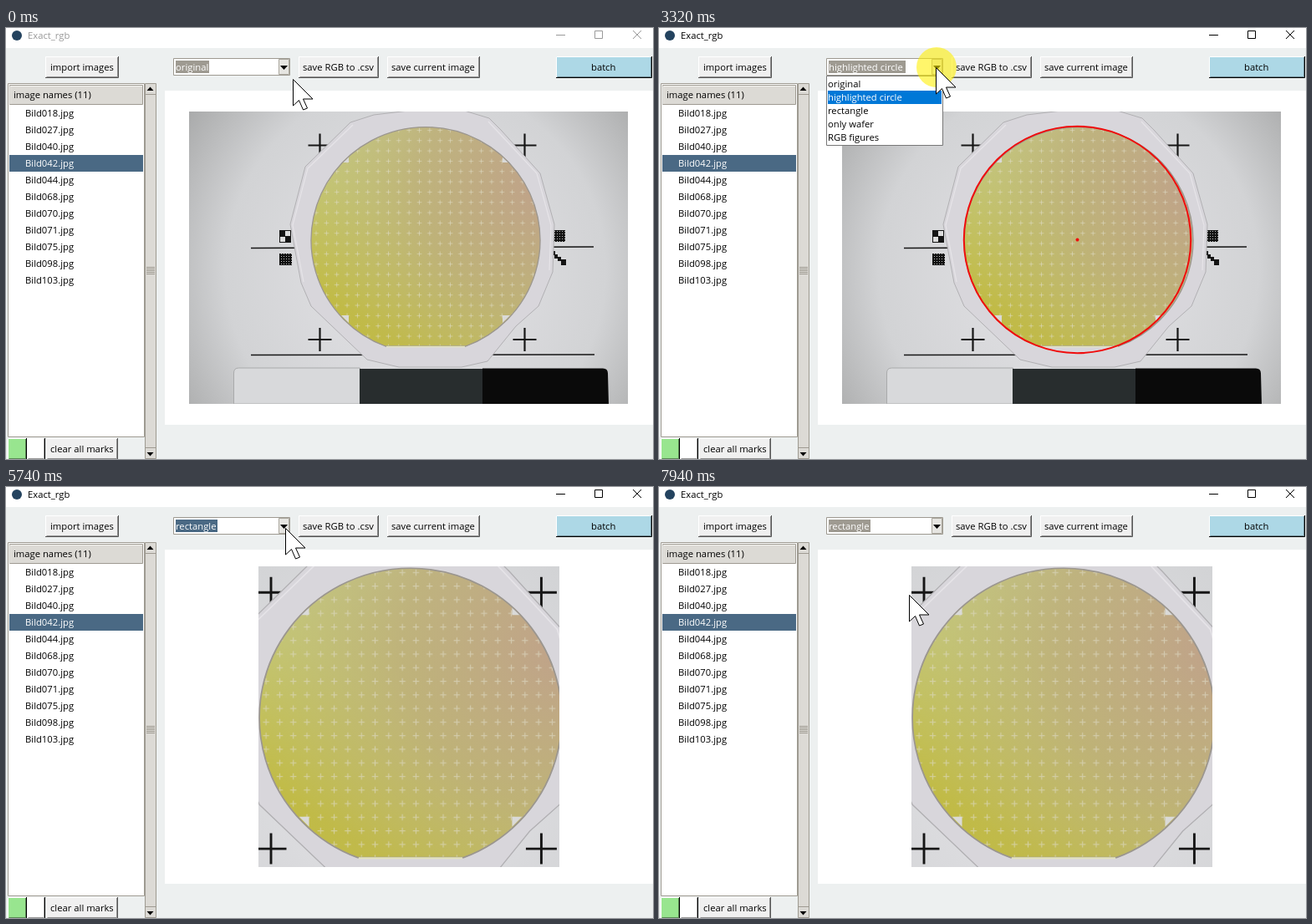
These frames come from a looping animation (774x516 px, 8000 ms). An HTML page:

```html
<!DOCTYPE html>
<html lang="en">
<head>
<meta charset="utf-8">
<title>Exact_rgb</title>
<style>
html, body { margin: 0; width: 100%; height: 100%; overflow: hidden; background: #edf0f0 }
svg { display: block }
text { font: 11.25px "Open Sans", "Noto Sans", sans-serif; white-space: pre }
</style>
</head>
<body>
<svg width="774" height="516" viewBox="0 0 774 516">
<defs>
  <radialGradient id="paper" gradientUnits="userSpaceOnUse" cx="490" cy="290" r="350">
    <stop offset=".3" stop-color="#dcdcdf"/><stop offset=".65" stop-color="#d2d3d5"/><stop offset="1" stop-color="#a2a3a3"/>
  </radialGradient>
  <linearGradient id="film" x1=".6" x2=".1" y2=".8">
    <stop offset="0" stop-color="#c6cc9c"/><stop offset=".5" stop-color="#c5c87a"/><stop offset="1" stop-color="#c1bb45"/>
  </linearGradient>
  <radialGradient id="blush" gradientUnits="userSpaceOnUse" cx="640" cy="190" r="290">
    <stop offset="0" stop-color="#c0a28a"/><stop offset=".5" stop-color="#bdad78" stop-opacity=".8"/><stop offset="1" stop-color="#bdb662" stop-opacity="0"/>
  </radialGradient>
  <pattern id="marks" patternUnits="userSpaceOnUse" x="611.83" y="362.83" width="12.35" height="12.33">
    <path d="M3.4 6.2h5.6M6.2 3.4v5.6" stroke="#ddd9c4" stroke-opacity=".65" stroke-width=".9"/>
  </pattern>
  <pattern id="check" patternUnits="userSpaceOnUse" x="655" y="242" width="3" height="3">
    <path d="M0 0h3v3h-3z" fill="#111"/><path d="M1 1h1v1h-1z" fill="#bbb"/>
  </pattern>
  <path id="disc" d="M454 381A137 135.500 0 1 1 550 381Z"/>
  <clipPath id="discClip"><use href="#disc"/></clipPath>
  <clipPath id="photoClip"><path d="M219 100h525v350H219z"/></clipPath>
  <clipPath id="cropClip"><path d="M302 95h360v360H302z"/></clipPath>
  <g id="scene" fill="none">
    <path d="M219 100h525v350H219z" fill="url(#paper)"/>
    <path d="M293 263.500L703 262M293 391.500L704 391" stroke="#161616" stroke-width="1.7"/>
    <path id="targets" stroke="#161616" stroke-width="2.200"/>
    <path d="M327 242h14v15h-14z" fill="#151515"/>
    <path d="M334 243h6v6h-6zM328 250h6v6h-6z" fill="#ddd"/>
    <path d="M327 270h15v14h-15zM655 242h14v14h-14z" fill="url(#check)"/>
    <path d="M653 267h4v4h3v3h4v3h6v7h-6v-5h-4v-3h-4v-4h-3z" fill="#151515"/>
    <path d="M272.500 450V413q0-6 6-6h145v43z" fill="#d8d9db" stroke="#a9aaab"/>
    <path d="M423 408h147v42H423z" fill="#282d2e"/>
    <path d="M570 407.500h144q6 0 6 6l1 37H570z" fill="#0a0a0a"/>
    <path d="M412 113L358 166L340 235L353 305L365 333L432 397L470 406H545L576 399L610 357L637 333L654 292L656 235L639 174L592 122L578 108L545 98H490L440 104Z" fill="#d8d6db" stroke="#b1b0b3"/>
    <path d="M415 116L361 168L343 236L356 304M577 112L635 174L652 236L650 290" stroke="#e6e4e8" stroke-width="1.200"/>
    <use href="#disc" fill="url(#film)"/>
    <use href="#disc" fill="url(#blush)"/>
    <g clip-path="url(#discClip)">
      <path d="M365 117h274v264H365z" fill="url(#marks)"/>
      <path d="M401 161l9-9v9zM594 152v9h9zM401 344h9v9zM594 344h9l-9 9z" fill="#dadad8"/>
    </g>
    <use href="#disc" stroke="#9b968f" stroke-width="1.300"/>
    <path d="M455 381.500h94" stroke="#e4e3bd" stroke-width="1.500"/>
  </g>
</defs>

<path fill="#edf0f0" d="M0 0h774v516H0z"/>
<path fill="#fff" d="M0 0h774v24H0zM190 75h584v400H190z"/>
<circle cx="13" cy="9" r="6" fill="#24435f"/>
<g id="caption">
  <text x="26" y="13">Exact_rgb</text>
  <path d="M658 8.500h11M704.500 3.500h9v9h-9zM750 3l10 10M760 3l-10 10" fill="none" stroke="currentColor"/>
</g>

<path d="M2.500 66.500h163v423H2.500z" fill="#fff" stroke="#9e9a91"/>
<path d="M4.500 68.500h159v23H4.500z" fill="#dcdad5" stroke="#9e9a91"/>
<path d="M5 91V69.500h158" fill="none" stroke="#f3f2ef"/>
<text x="9" y="84">image names (11)</text>
<path d="M4 152h160v20H4z" fill="#4a6984"/>
<g id="files"></g>
<path d="M166.500 66.500h13v449h-13z" fill="#dcdad5" stroke="#9e9a91"/>
<path d="M166 79.500h14M166 502.500h14M168 286.500h10M168 288.500h10M168 290.500h10M168 292.500h10M168 294.500h10" stroke="#9e9a91"/>
<path d="M168.500 75h8l-4-4.500zM168.500 508h8l-4 4.500z"/>
<g id="buttons"></g>

<g id="full" clip-path="url(#photoClip)">
  <use href="#scene"/>
  <g id="ring">
    <circle cx="500.500" cy="253.500" r="135.700" fill="none" stroke="#f00c0c" stroke-width="2"/>
    <circle cx="500.500" cy="253.500" r="2" fill="#f00c0c"/>
  </g>
</g>
<g id="crop" clip-path="url(#cropClip)">
  <use href="#scene" transform="translate(484 276) scale(1.32) translate(-502 -254)"/>
</g>

<path d="M200.500 36.500h139v20h-139z" fill="#fff" stroke="#9e9a91"/>
<path d="M326.500 37.500h12v18h-12z" fill="#e6e5e1" stroke="#aaa69d"/>
<path d="M328 45h9l-4.500 5z"/>
<rect id="mark" x="203" y="39" height="15"/>
<text id="value" x="203" y="51" fill="#fff"></text>

<g id="list">
  <path d="M200.500 57.500h139v83h-139z" fill="#fff" stroke="#777"/>
  <rect id="hover" x="202" width="136" height="16" fill="#0078d7"/>
  <g id="options"></g>
</g>
<circle id="click" r="24" fill="#fff000" fill-opacity=".58"/>
<path id="cursor" d="M-.5.5V32L6.500 25.500L11.500 37L16.500 35L11.500 24H23Z" fill="#fff" stroke="#000" stroke-linejoin="round"/>
</svg>

<script>
const $ = id => document.getElementById(id);
const LOOP = 8000;
const names = ['original', 'highlighted circle', 'rectangle', 'only wafer', 'RGB figures'];
const widths = [40, 92, 50];

// time, x, y of the pointer tip
const path = [
  [0, 344, 61], [310, 344, 61], [680, 332, 47], [1050, 332, 50], [1400, 317, 77],
  [2210, 317, 77], [2970, 332, 47], [3450, 332, 47], [4010, 301, 92], [4740, 301, 92],
  [5540, 335, 49], [6160, 335, 49], [6860, 305, 117], [6990, 305, 118], [7190, 305, 118],
  [7530, 300, 129], [LOOP, 300, 129]
];
const opened = [[680, 1950], [3320, 4740], [6090, 7940]];
const clicks = [[680, 830], [3320, 3450], [6090, 6230], [7860, 7940]];
const fresh = [[2210, 3320], [5740, 6090]];

const label = (s, x, y, fill = '#000') => `<text x="${x}" y="${y}" fill="${fill}">${s}</text>`;

function button(x, y, w, h, s = '', tx = 0, fill = '#f0f0f0', edge = '#555') {
  const r = x + w - .5, b = y + h - .5;
  return `<path d="M${x} ${y}h${w}v${h}h${-w}z" fill="${fill}"/>
    <path d="M${x + .5} ${b}V${y + .5}H${r}" fill="none" stroke="#fff"/>
    <path d="M${x + 1.5} ${b - 1}H${r - 1}V${y + 1}" fill="none" stroke="#0006"/>
    <path d="M${x} ${b}H${r}V${y}" fill="none" stroke="${edge}"/>` + label(s, tx, y + 17);
}

$('buttons').innerHTML =
  button(47, 34, 88, 26, 'import images', 53) +
  button(350, 34, 96, 26, 'save RGB to .csv', 355) +
  button(456, 34, 111, 26, 'save current image', 461) +
  button(658, 34, 115, 26, 'batch', 700, '#add8e6', '#000') +
  button(2, 491, 23, 26, '', 0, '#98e58f', '#000') +
  button(25, 491, 22, 26, '', 0, '#fff', '#000') +
  button(48, 491, 86, 26, 'clear all marks', 53);

$('files').innerHTML = ['018', '027', '040', '042', '044', '068', '070', '071', '075', '098', '103']
  .map((n, i) => label(`Bild${n}.jpg`, 23, 106 + 20 * i, i == 3 ? '#fff' : '#000')).join('');
$('options').innerHTML = names.map((s, i) => label(s, 202, 71 + 16 * i)).join('');
$('targets').setAttribute('d', [375.5, 620.5].flatMap(x => [140.5, 373].map(y =>
  `M${x - 14} ${y}h28M${x} ${y - 14}v28`)).join(''));

const within = (spans, t) => spans.some(([a, b]) => t >= a && t < b);
const show = (id, on) => $(id).style.display = on ? '' : 'none';
const set = (id, name, v) => $(id).setAttribute(name, v);

function pointer(t) {
  const i = path.findIndex(k => k[0] > t);
  const [t0, x0, y0] = path[i - 1], [t1, x1, y1] = path[i];
  const u = (t - t0) / (t1 - t0), s = u * u * (3 - 2 * u);
  return [x0 + (x1 - x0) * s, y0 + (y1 - y0) * s];
}

function draw(t) {
  const [x, y] = pointer(t).map(Math.round);
  const mode = t < 2210 ? 0 : t < 5740 ? 1 : 2;
  const row = y < 59 ? mode : Math.floor((y - 59) / 16);
  const ink = t < 680 ? '#999' : '#000';

  $('caption').style.color = ink;
  set('caption', 'fill', ink);
  show('full', mode < 2);
  show('ring', mode == 1);
  show('crop', mode == 2);

  $('value').textContent = names[mode];
  set('mark', 'width', widths[mode]);
  set('mark', 'fill', within(fresh, t) ? '#4a6984' : '#9e9a91');

  show('list', within(opened, t));
  set('hover', 'y', 59 + 16 * row);
  [...$('options').children].forEach((o, i) => o.setAttribute('fill', i == row ? '#fff' : '#000'));

  const at = `translate(${x} ${y})`;
  show('click', within(clicks, t));
  set('click', 'transform', at);
  set('cursor', 'transform', at);
}

const start = performance.now();
function frame() {
  draw((performance.now() - start) % LOOP);
  requestAnimationFrame(frame);
}
frame();
</script>
</body>
</html>
```
